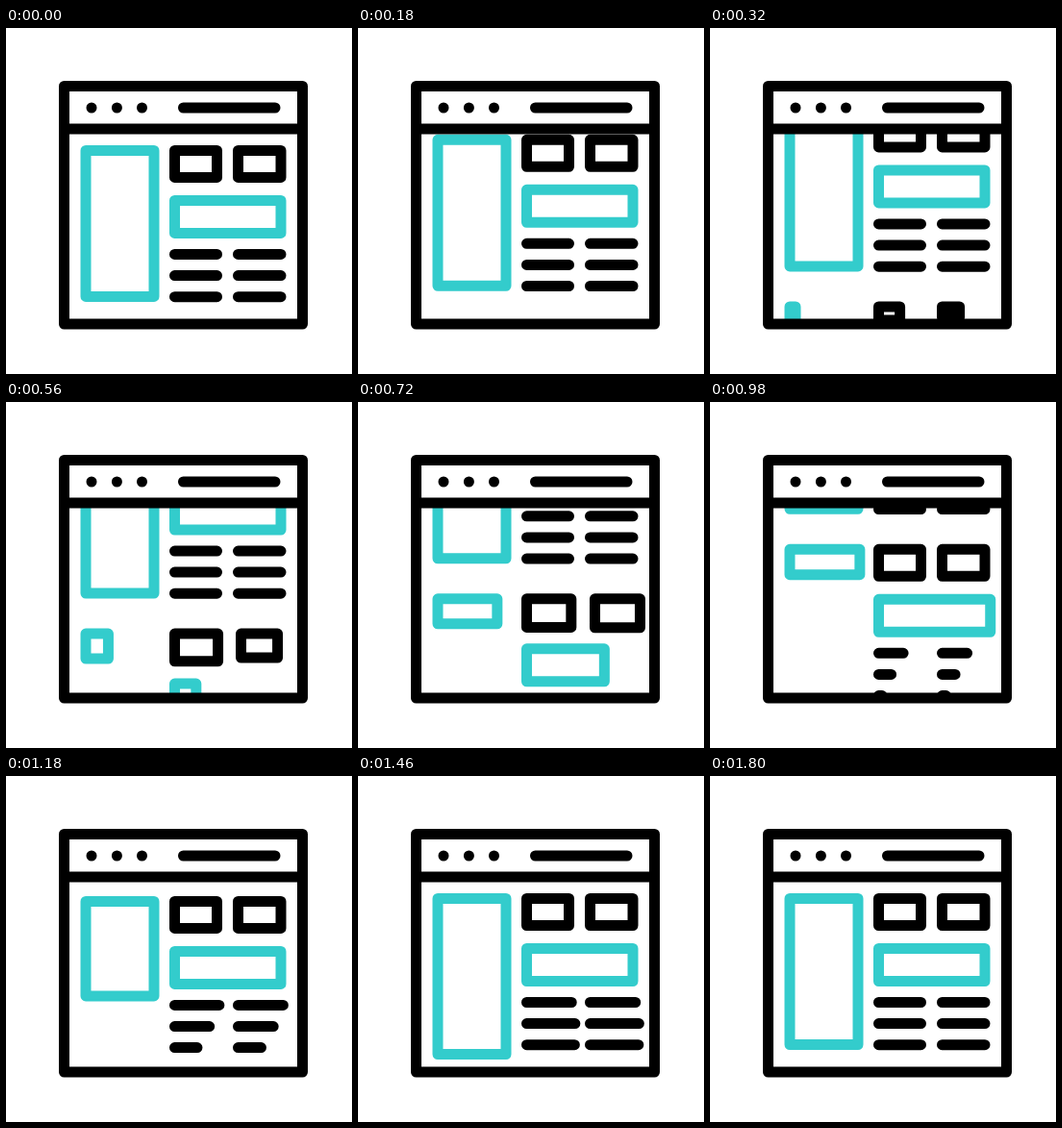
Animation of 360 by 360 pixels, one loop 2.02 s. Source, as an HTML page:

```html
<!DOCTYPE html>
<html lang="en">
<head>
<meta charset="utf-8">
<title>Scrolling page icon</title>
<style>
  html, body { margin: 0; width: 100%; height: 100%; overflow: hidden; background: #fff; }
  svg { display: block; width: 100%; height: 100%; }
  path, rect { fill: none; stroke: #000; stroke-width: 11; stroke-linejoin: round; stroke-linecap: round; }
  .accent { stroke: #33cccc; }
</style>
</head>
<body>
<svg viewBox="0 0 360 360">
  <clipPath id="view"><path d="M62 105H307V307H62z"/></clipPath>
  <g clip-path="url(#view)">
    <g id="oldPage"></g>
    <g id="newPage"></g>
  </g>
  <rect x="60.5" y="60.5" width="248" height="247.5"/>
  <path d="M60.5 105H308.5M184.5 83H280"/>
  <path d="M89 83h.01M115.4 83h.01M141.5 83h.01"/>
</svg>
<script>
const LOOP = 2020;
const PAGE_STEP = 194;
const STROKE = 11;

const smooth = u => {
  u = Math.min(1, Math.max(0, u));
  return u * u * (3 - 2 * u);
};
const mix = (a, b, u) => a + (b - a) * u;

// Grow to a peak beyond the final size, then settle back.
const grow = (t, start, length, from, peak, rest, settle = 280) =>
  t < start + length
    ? mix(from, peak, smooth((t - start) / length))
    : mix(peak, rest, smooth((t - start - length) / settle));

// Linear interpolation through [time, value] pairs.
function track(t, keys) {
  const next = keys.findIndex(k => k[0] > t);
  if (next < 0) return keys[keys.length - 1][1];
  if (next === 0) return keys[0][1];
  const [t0, a] = keys[next - 1], [t1, b] = keys[next];
  return mix(a, b, (t - t0) / (t1 - t0));
}

// Sizes are outer sizes; the stroke is centred half its width inside.
const box = (x, y, w, h) => {
  const iw = w - STROKE, ih = h - STROKE;
  return `M${x + STROKE / 2} ${y + STROKE / 2}h${iw}v${ih}h${-iw}z`;
};
const line = (x, y, w) => `M${x + STROKE / 2} ${y}h${Math.max(0.01, w - STROKE)}`;

function pagePaths(t) {
  const tall = box(77.5, 122,
    grow(t, 427, 408, 17, 86, 82),
    grow(t, 970, 410, 37, 176, 163, 260));
  const wide = box(170, 174, grow(t, 433, 460, 11, 129, 121.5), 45);
  const left = box(170, 122,
    grow(t, 31, 604, 11, 58, 55),
    grow(t, 31, 604, 11, 41, 39));
  const right = box(
    track(t, [[320, 236], [560, 239], [720, 241], [960, 236]]),
    122,
    track(t, [[40, 11], [320, 29], [560, 49], [700, 58], [740, 58], [960, 55.5]]),
    track(t, [[40, 11], [320, 22], [560, 36], [700, 41], [740, 41], [960, 39]]));
  let lines = '';
  for (let i = 0; i < 3; i++) {
    const w = grow(t, 660 + 109 * i, 640, 11, 62, 55);
    const y = 235.5 + 22.1 * i;
    lines += line(170, y, w) + line(236, y, w + 0.5);
  }
  return { accent: tall + wide, dark: left + right + lines };
}

function makePage(id) {
  const group = document.getElementById(id);
  const add = cls => {
    const path = document.createElementNS('http://www.w3.org/2000/svg', 'path');
    path.setAttribute('class', cls);
    group.append(path);
    return path;
  };
  const accent = add('accent'), dark = add('dark');
  return (t, y) => {
    const paths = pagePaths(t);
    accent.setAttribute('d', paths.accent);
    dark.setAttribute('d', paths.dark);
    group.setAttribute('transform', `translate(0 ${y})`);
  };
}

const drawOld = makePage('oldPage');
const drawNew = makePage('newPage');

function render(t) {
  const scroll = PAGE_STEP * smooth((t + 6) / 1280);
  drawOld(LOOP, -scroll);
  drawNew(t, PAGE_STEP - scroll);
}

const begin = performance.now();
function tick() {
  render((performance.now() - begin) % LOOP);
  requestAnimationFrame(tick);
}
render(0);
requestAnimationFrame(tick);
</script>
</body>
</html>
```
